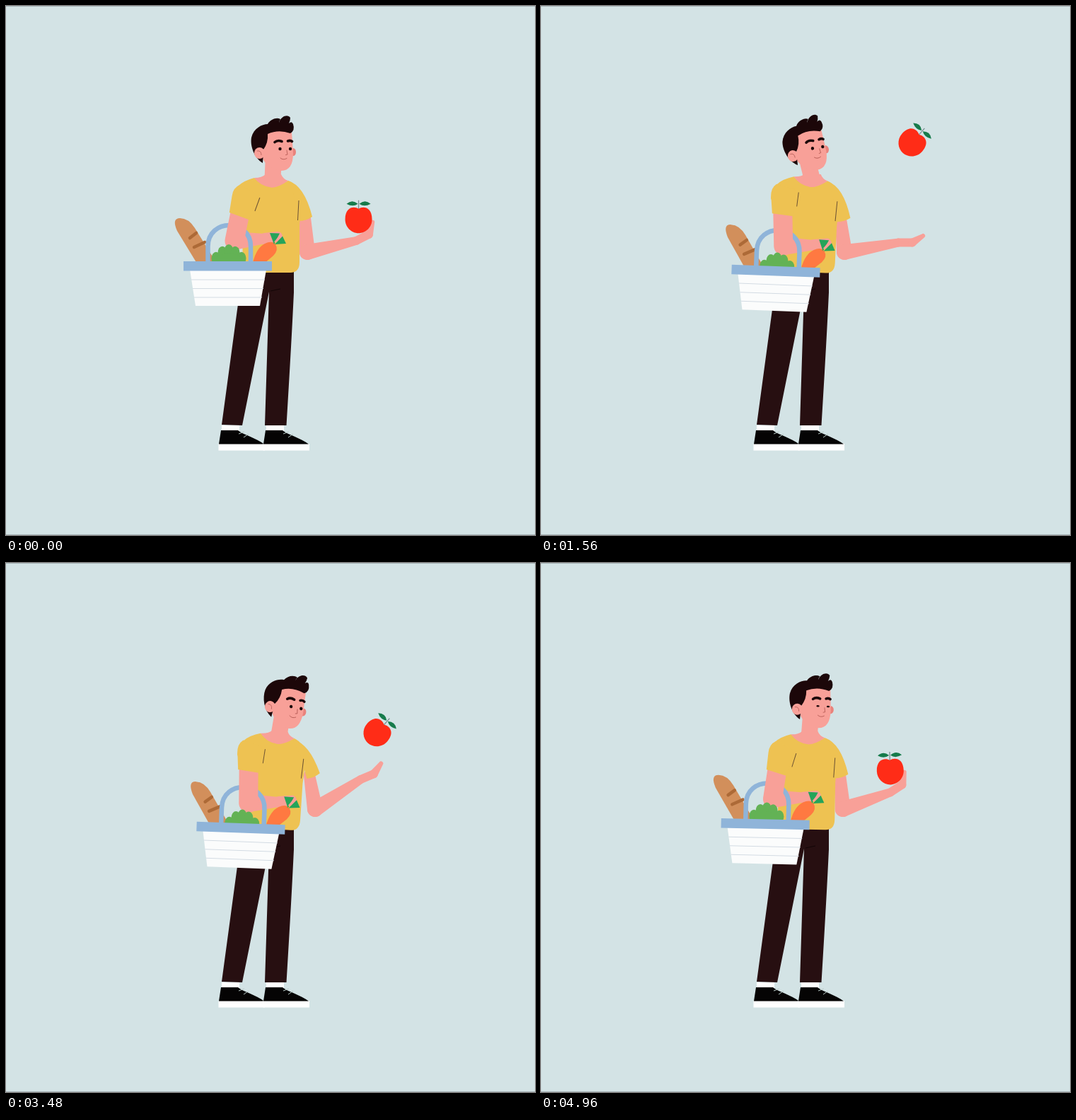
Animation of 748x748 px, one loop 5 s. Source, as an HTML page with a canvas:

```html
<!DOCTYPE html>
<html>
<head>
<meta charset="utf-8">
<style>
  html, body { margin: 0; overflow: hidden; background: #d3e3e5; }
  canvas { display: block; }
</style>
</head>
<body>
<canvas width="748" height="748"></canvas>
<script>
const ctx = document.querySelector('canvas').getContext('2d');
const LOOP = 5000, CYCLE = 2400, STEP = 40, RAD = Math.PI / 180;
const RELEASE = 1000, CATCH = 1840, APEX = 1385;
const SKIN = '#f8a098', SHIRT = '#eec252', DARK = '#1c0709', PANTS = '#270f11', BLUE = '#8fb4d9';

const mix = (a, b, u) => a + (b - a) * u;

function turned([x, y], deg) {
  const c = Math.cos(deg * RAD), s = Math.sin(deg * RAD);
  return [x * c - y * s, x * s + y * c];
}
const add = (a, b) => [a[0] + b[0], a[1] + b[1]];
const along = (point, length, deg) => add(point, turned([length, 0], deg));

// A part's frame: its rest pivot, where the pivot is now, and its turn.
const frame = (pivot, at, deg) => ({ pivot, at, deg });
const place = (f, [x, y]) => add(f.at, turned([x - f.pivot[0], y - f.pivot[1]], f.deg));

function inFrame(f, draw) {
  ctx.save();
  ctx.translate(...f.at);
  ctx.rotate(f.deg * RAD);
  ctx.translate(-f.pivot[0], -f.pivot[1]);
  draw();
  ctx.restore();
}

function poseAt(time) {
  const ease = (from, to) => {
    const u = Math.min(1, Math.max(0, (time - from) / (to - from)));
    return u * u * (3 - 2 * u);
  };
  // Each gesture rises and falls between 0 and 1.
  const gesture = (a, b, c, d) => ease(a, b) - ease(c, d);
  const lean = gesture(0, 480, 1280, 2080);
  const nod = gesture(40, 400, 1080, 1640);
  const lookUp = gesture(1080, 1640, 1680, 1960);
  const sway = gesture(0, 560, 1720, 2240);
  const cock = gesture(0, 340, 340, 680);
  const lift = gesture(680, 1060, 1120, 1680);
  const open = gesture(400, 1000, 2000, CYCLE);
  const settle = gesture(1720, 1960, 2000, CYCLE);
  const blink = gesture(60, 140, 340, 420);

  const forearm = -13 - 14 * cock + 6 * open - 26 * lift + 7 * settle;
  const elbow = [426 + 3 * lean + 8 * lift, 348];
  const wrist = along(elbow, mix(71, 77, open), forearm);
  const palm = along(wrist, 20, forearm + mix(-14, 10, open));
  const tip = along(palm, 18, forearm + mix(-60, -22, open));

  const grip = [mix(-9.5, 2, open), mix(-23, -20, open)];
  let apple = add(palm, turned(grip, forearm * (1 - open)));
  if (time > RELEASE && time < CATCH) apple = [524, 171 + .00075 * (time - APEX) ** 2];

  return {
    elbow, wrist, palm, tip, apple, lift,
    appleTurn: 41 * open + 12 * settle - 4 * cock,
    torso: frame([390, 378], [390, 378], 3.8 * lean),
    head: frame([383, 208], [383 + 14.5 * nod - 3.5 * lookUp - 1.5 * settle, 208],
      11.5 * nod - 10.5 * lookUp + 6.5 * settle),
    basket: frame([313.5, 367.5], [313.5 + 18.5 * sway - 6 * settle, 367.5 + 7 * sway + 5 * settle],
      2.1 * sway + 2 * cock + 4.6 * settle),
    sink: 4.5 * open,
    eye: 2.3 - blink
  };
}

function fill(color, d) {
  ctx.fillStyle = color;
  ctx.fill(new Path2D(d));
}

function line(color, width, d) {
  ctx.strokeStyle = color;
  ctx.lineWidth = width;
  ctx.stroke(new Path2D(d));
}

function oval(color, x, y, rx, ry = rx) {
  ctx.fillStyle = color;
  ctx.beginPath();
  ctx.ellipse(x, y, rx, ry, 0, 0, 7);
  ctx.fill();
}

// Tapered limb with round ends.
function limb([x1, y1], r1, [x2, y2], r2) {
  const a = Math.atan2(y2 - y1, x2 - x1), q = Math.PI / 2;
  ctx.fillStyle = SKIN;
  ctx.beginPath();
  ctx.arc(x1, y1, r1, a + q, a + 3 * q);
  ctx.arc(x2, y2, r2, a - q, a + q);
  ctx.fill();
}

function drawLegs() {
  fill(PANTS, 'M335 370H407V405Q404 470 396.5 593H366L372 404L334 593L305 592Z');
  line('#120506', 1, 'M374 403L388 400');
  for (const x of [0, 63]) inFrame(frame([0, 0], [x, 0], 0), () => {
    fill('#fff', 'M305 593H330V601H305ZM300.5 619H366V628.5H300.5Z');
    fill('#050404', 'M304 600H328C335 606 354 611 365 619.5H301Z');
    line('#b9c9c6', 1, 'M329 605L337 602M336 610L343 605');
  });
}

function drawRightArm({ elbow, wrist, palm, tip, lift }) {
  limb([423 + 6 * lift, 300], 8, elbow, 11);
  limb(elbow, 11, wrist, 6);
  limb(wrist, 6, palm, 6);
  limb(palm, 6, tip, 3);
}

function drawShirt({ torso, lift }) {
  inFrame(torso, () => {
    fill(SHIRT, 'M335 377L334 310L320 275Q320 251 351 243Q372 263 399 247Q412 252 418 270L415 310V362Q415 377 402 377Z');
    fill(SKIN, 'M351 243Q362 243 367 238H389Q392 245 399 247Q385 257 375 256.5Q360 255 351 243Z');
    inFrame(frame([410, 262], [410, 262], -9 * lift), () =>
      fill(SHIRT, 'M399 247Q422 254 433 298Q424 304 414 304L408 270Z'));
    line('#6b5133', 1, 'M414 275L412.5 303');
  });
}

function drawHead({ torso, head, eye }) {
  limb(place(torso, [377, 245]), 11.5, place(head, [378, 222]), 11.5);
  inFrame(head, () => {
    oval('#e9837c', 406, 206.5, 4, 5.5);
    fill(SKIN, 'M367 180Q385 172 404 179L406 208Q406 233 389 233Q372 232 363 216Z');
    fill(DARK, 'M363 222C351 215 345 198 347 186C350 173 362 167 370 167C374 160 383 157 388 160Q386 163 386 165C389 155 399 153 402 158Q402 162 400 166Q404 162 406 167Q409 176 402 180Q385 174 370 181Q371 193 364 203Z');
    oval(SKIN, 358.5, 208, 7.5, 8);
    line('#b9655f', .9, 'M355 205Q361 204 361 211');
    ctx.lineCap = 'round';
    line(DARK, 3.6, 'M380 192.5Q384 189 390 191.5M398.5 191Q402 189.5 404.5 191.5');
    line('#b0554f', .8, 'M397 204L398 210L395.5 210.5M388 215Q392 218.5 397 215.5');
    ctx.lineCap = 'butt';
    for (const x of [387.5, 402]) oval(DARK, x, 202, 2.2, eye);
  });
}

function drawBread() {
  fill('#d28f5b', 'M270 364L242 318Q234 300 246 300Q258 300 267 314L298 364Z');
  ctx.lineCap = 'round';
  line('#ad6a37', 4.5, 'M260 328L269 321M266 341L281 334');
  ctx.lineCap = 'butt';
}

function drawLettuce() {
  for (let i = -2; i <= 2; i++) oval('#63b255', 315 + 9 * i, 346 + 2.7 * i * i, 6.5, 9);
  oval('#63b255', 315, 358, 18, 8);
}

function drawLeftSide({ torso, basket, sink }) {
  const shoulder = place(torso, [336, 268]), elbow = place(basket, [323, 332]);
  const swing = Math.atan2(shoulder[0] - elbow[0], elbow[1] - shoulder[1]) / RAD;

  inFrame(basket, () => {
    inFrame(frame([0, 0], [.4 * sink, sink], 0), drawBread);
    limb([323, 332], 13, [366, 329], 7);
    limb([366, 329], 8, [384, 326], 7);
    line(BLUE, 6.5, 'M285.5 363V340C285.5 300 346 300 346 340V363');
  });

  limb(along(shoulder, 14, swing + 90), 13.5, elbow, 13.5);
  inFrame(frame([0, 0], shoulder, swing), () => {
    fill(SHIRT, 'M-15 27.5L14.5 32L18 -6L-8 -14Q-17 -8 -16 4Z');
    line('#6b5133', 1, 'M23 -1.6L20 18.4');
  });

  inFrame(basket, () => {
    inFrame(frame([0, 0], [0, sink], 0), drawLettuce);
    fill('#ff7941', 'M349 363Q354 342 366 336Q376 331 381 337Q386 345 378 353Q370 360 366 363Z');
    fill('#25a45a', 'M373 321L387 321.5L379 337ZM380 337L391 325.5L396 336Z');
    line(SKIN, 2, 'M380 334L388 324');
    fill('#fbfcfc', 'M260 373H368L359 424H268Z');
    line('#d3dbe3', 1, 'M262 387H366M264 399.5H364M266 412H362');
    fill(BLUE, 'M251 361H376V374.5H251Z');
  });
}

function drawApple({ apple, appleTurn }) {
  inFrame(frame([0, 0], apple, appleTurn), () => {
    line('#7b8f92', 1.3, 'M0 -14V-28');
    fill('#167b4b', 'M-1 -23Q-9 -30 -17 -23Q-8 -18 -1 -23ZM1 -23Q9 -30 17 -23Q8 -18 1 -23Z');
    fill('#ff2c17', 'M0 -16C-6 -20 -19 -19 -19 -1C-19 10 -10 18.5 0 18.5C10 18.5 19 10 19 -1C19 -19 6 -20 0 -16Z');
  });
}

function draw(time) {
  const pose = poseAt(time);
  fill('#d3e3e5', 'M0 0H748V748H0Z');
  fill('#a9b6b9', 'M0 0H748V1H0ZM0 747H748V748H0Z');
  drawLegs();
  drawRightArm(pose);
  drawShirt(pose);
  drawHead(pose);
  drawLeftSide(pose);
  drawApple(pose);
}

const start = performance.now();
function tick() {
  const elapsed = (performance.now() - start) % LOOP;
  draw(Math.floor(elapsed / STEP) * STEP % CYCLE);
  requestAnimationFrame(tick);
}
tick();
</script>
</body>
</html>
```
